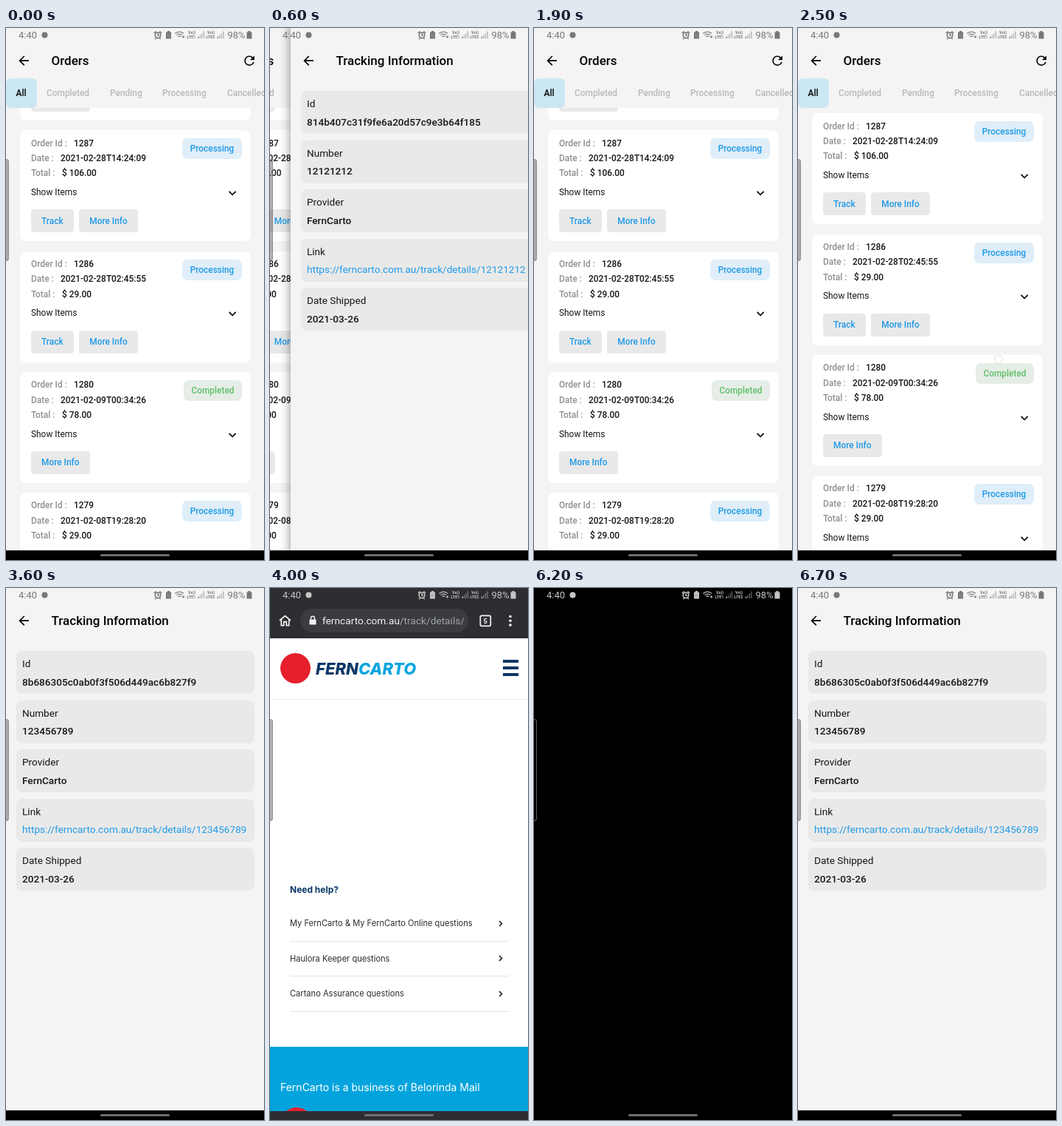
Recreate the animation shown at these times as an HTML page. Size 350x719 px, loop 6.8 s.

```html
<!DOCTYPE html>
<html lang="en">
<head>
<meta charset="utf-8">
<title>Orders and tracking</title>
<style>
  * { box-sizing: border-box; margin: 0; }
  html, body { width: 100%; height: 100%; overflow: hidden; background: #000; }
  body { font: 500 11.9px/20px Roboto, sans-serif; color: #161616; }
  #stage { position: relative; width: 350px; height: 719px; overflow: hidden; background: #000; }
  #stage div, #stage p, #stage svg { position: absolute; }
  p { white-space: pre; }
  #app { left: 0; top: 0; width: 350px; height: 706px; overflow: hidden; }
  .page { inset: 0; background: #f4f4f4; }
  .track::before { content: ""; position: absolute; left: -17.5px; top: 0; width: 17.5px; height: 100%;
    background: linear-gradient(90deg, rgba(0,0,0,0), rgba(0,0,0,.016) 30%, rgba(0,0,0,.07) 60%, rgba(0,0,0,.22)); }
  .title { font-size: 17px; color: #000; }
  .icon { width: 20.4px; height: 20.4px; fill: #000; }

  .tab { color: #b9b9b9; }
  .tab.on { color: #000; }
  #all { left: 0; top: 68px; width: 42px; height: 40px; border-radius: 7px; background: #cce7f4; }
  #view { left: 0; top: 108px; width: 350px; height: 598px; overflow: hidden; }
  #list { inset: 0; }
  .card { left: 19px; width: 312.5px; height: 150px; border-radius: 8px; background: #fff; }
  .key { color: #8f8f8f; }
  .plain { font-weight: 400; }
  .pill, .btn { display: flex; align-items: center; justify-content: center; color: #209ae6; }
  .pill { right: 11.5px; top: 11px; height: 28px; border-radius: 7px; background: #dfeef8; width: 81px; }
  .pill.done { width: 79px; color: #5fc069; background: #e6ede6; }
  .btn { top: 107px; height: 31px; border-radius: 4px; background: #e9e9e9; }

  .box { left: 14px; width: 322.5px; height: 58px; border-radius: 8px; background: #e9e9e9; }
  .box p { left: 8px; font-size: 13.6px; }
  .box .link { color: #209ae6; font-weight: 400; }

  #web { inset: 0; overflow: hidden; background: #fff; font-family: Inter, sans-serif; }
  #bar, #nav { left: 0; width: 350px; background: #2d2e31; }
  #bar { top: 0; height: 68px; }
  #nav { top: 707px; height: 12px; }
  #pill { left: 41px; top: 28px; width: 228px; height: 32px; border-radius: 16px; background: #3b3c40; }
  #url { left: 71px; top: 34px; width: 192px; overflow: hidden; font: 400 13.7px/20px Roboto, sans-serif; color: #a2a5a9; }
  #url b { font-weight: 400; color: #f2f2f2; }
  #head { left: 0; top: 67px; width: 350px; height: 84px; background: #fff; border-bottom: 1px solid #ebebeb; }
  .disc { border-radius: 50%; background: #e5202c; }
  .mark { font-size: 22px; font-weight: 800; font-style: italic; color: #0b3767; }
  .mark i { color: #08a5df; }
  #body { inset: 0; }
  #foot { left: 0; top: 400px; width: 350px; height: 340px; background: #03a4dd; }
  .help { font-size: 12px; font-weight: 700; color: #0b3767; }
  .row { font-size: 11.1px; font-weight: 400; color: #2c2c2c; }
  .note { font-size: 14px; font-weight: 400; color: #fff; }
  .owner { font: 500 24px/20px Roboto, sans-serif; color: #fff; }
  .menu { font-size: 16px; font-weight: 700; color: #fff; }
  .rule { height: 1px; }
  .bar { left: 316px; width: 21px; height: 4px; background: #0b3767; }

  #black { inset: 0; background: #000; }
  #status { left: 0; top: 0; width: 350px; height: 20px; }
  #edge { left: -4px; top: 177px; width: 8px; height: 138px; border-radius: 4px;
          background: rgba(0, 0, 0, .3); border: 1px solid rgba(135, 135, 135, .7); }
  #grip { left: 128px; top: 711px; width: 94px; height: 3px; border-radius: 2px; background: #6e6e6e; }
  #dot { left: -6px; top: -6px; width: 12px; height: 12px; border-radius: 50%;
         background: rgba(255, 255, 255, .7); border: 1px solid rgba(170, 170, 170, .35); }
  #back { left: -6px; top: -9px; width: 12px; height: 18px; fill: none; stroke: #acacac; stroke-width: 1.6; }
</style>
</head>
<body>
<div id="stage">
  <div id="app">
    <div id="orders" class="page"></div>
    <div id="first" class="page track"></div>
    <div id="second" class="page track"></div>
  </div>
  <div id="web">
    <div id="body"></div>
    <div id="head">
      <div class="disc" style="left:13.5px;top:21px;width:41px;height:41px"></div>
      <p class="mark" style="left:62px;top:32px">FERN<i>CARTO</i></p>
      <div class="bar" style="top:30px"></div>
      <div class="bar" style="top:39px"></div>
      <div class="bar" style="top:48px"></div>
    </div>
    <div id="bar">
      <div id="pill"></div>
      <svg width="350" height="67" fill="none" stroke="#f2f2f2" stroke-width="1.7">
        <path d="M13 44 20.5 37.5 28 44M15.3 42.500V50.700h3.400v-5h3.600v5h3.400V42.500"/>
        <rect x="285.3" y="37.3" width="14" height="14" rx="2"/>
        <path d="M55.5 43v-2.2a2.5 2.5 0 0 1 5 0V43" stroke-width="1.4"/>
        <g fill="#f2f2f2" stroke="none">
          <rect x="53.5" y="42.5" width="9" height="7" rx="1"/>
          <circle cx="326" cy="38.5" r="1.8"/><circle cx="326" cy="44.3" r="1.8"/><circle cx="326" cy="50.1" r="1.8"/>
          <text x="292.3" y="47.7" font-size="9.5" font-weight="700" font-family="Roboto, sans-serif" text-anchor="middle">5</text>
        </g>
      </svg>
      <p id="url"><b>ferncarto.com.au</b>/track/details/</p>
    </div>
    <div id="nav"></div>
  </div>
  <div id="black"></div>
  <svg id="status" fill="currentColor" font-family="Roboto, sans-serif">
    <g font-size="13" font-weight="400">
      <text x="17" y="14">4:40</text><text x="300.5" y="14">98%</text>
    </g>
    <circle cx="52.5" cy="9.5" r="4"/>
    <g fill="none" stroke="currentColor" stroke-width="1.6">
      <circle cx="206" cy="9.8" r="3.8"/>
      <path d="M206 7.5V10h2M201 6.800l2.600-2.300M211 6.800l-2.600-2.300M202.300 15l1.200-1.500M209.700 15l-1.200-1.500"/>
      <path d="M229.5 7.5a8 8 0 0 1 11.5 0M231.5 9.700a5.200 5.200 0 0 1 7.500 0M233.500 11.800a2.500 2.500 0 0 1 3.500 0" stroke-width="1.2"/>
      <path d="M238.500 12h4M240.500 10.300v3.400" stroke-width="1"/>
    </g>
    <path d="M217 5.500h2V4h3v1.500h2v9h-7zM326.500 5.500h2V4h3v1.500h2v9h-7z"/>
    <path d="M219 8.500h3v3h-3z" fill="none" stroke="#999" stroke-width=".8"/>
    <g font-size="5.4" font-weight="700">
      <text x="247" y="8">Vo))</text><text x="245.5" y="14">LTE1</text>
      <text x="273" y="8">Vo))</text><text x="271.5" y="14">LTE2</text>
    </g>
    <g stroke="currentColor" stroke-width="1.3">
      <path d="M261 11.500v2.500M287.500 11.500v2.500"/>
      <path d="M263.500 9.500v4.500M266 7v7M268.500 4.500v9.500M290 9.500v4.500M292.500 7v7M295 4.500v9.500" opacity=".5"/>
    </g>
  </svg>
  <div id="edge"></div>
  <div id="grip"></div>
  <svg id="back"><path d="M10.5 1 2 9l8.5 8"/></svg>
  <div id="dot"></div>
</div>
<script>
const $ = id => document.getElementById(id);

// Static content: x is the left edge, y the middle of the line
const text = (x, y, str, cls = '') =>
  `<p class="${cls}" style="left:${x}px;top:${y - 10}px">${str}</p>`;
const icon = (x, y, d) =>
  `<svg class="icon" viewBox="0 0 24 24" style="left:${x - 10.2}px;top:${y - 10.2}px"><path d="${d}"/></svg>`;
const btn = (x, w, str) => `<div class="btn" style="left:${x}px;width:${w}px">${str}</div>`;

const ARROW = 'M20 11H7.83l5.59-5.59L12 4l-8 8 8 8 1.41-1.41L7.83 13H20z';
const REFRESH = 'M17.65 6.35A8 8 0 1 0 19.73 14h-2.08A6 6 0 1 1 12 6c1.66 0 3.14.69 4.22 1.78L13 11h7V4z';
const DOWN = 'M16.59 8.59 12 13.17 7.41 8.59 6 10l6 6 6-6z';

function card([id, date, total, done], i) {
  const buttons = done ? btn(15, 79.5, 'More Info') : btn(15, 57.5, 'Track') + btn(80, 80, 'More Info');
  return `<div class="card" style="top:${30.3 + 163.3 * (i - 1)}px">
    ${text(15, 17.3, 'Order Id :', 'key')}${text(73, 17.3, id)}
    ${text(15, 37.7, 'Date :', 'key')}${text(55, 37.7, date)}
    ${text(15, 58.2, 'Total :', 'key')}${text(57, 58.2, '$ ' + total)}
    ${text(15, 83.7, 'Show Items', 'plain')}${icon(288.5, 85, DOWN)}
    <div class="pill ${done ? 'done' : ''}">${done ? 'Completed' : 'Processing'}</div>${buttons}</div>`;
}

const orders = [
  ['1288', '2021-03-01T10:12:40', '54.00', true],
  ['1287', '2021-02-28T14:24:09', '106.00'],
  ['1286', '2021-02-28T02:45:55', '29.00'],
  ['1280', '2021-02-09T00:34:26', '78.00', true],
  ['1279', '2021-02-08T19:28:20', '29.00']
];
const tabs = [[55, 'Completed'], [141, 'Pending'], [212, 'Processing'], [300, 'Cancelled']];
const appBar = title => icon(24, 44, ARROW) + text(61.5, 44, title, 'title');

$('orders').innerHTML = appBar('Orders') + icon(330, 44, REFRESH) +
  '<div id="all"></div>' + text(13.5, 87.5, 'All', 'tab on') +
  tabs.map(([x, name]) => text(x, 87.5, name, 'tab')).join('') +
  `<div id="view"><div id="list">${orders.map(card).join('')}</div></div>`;

function tracking(id, number) {
  const rows = [['Id', id], ['Number', number], ['Provider', 'FernCarto'],
    ['Link', 'https://ferncarto.com.au/track/details/' + number, 'link'], ['Date Shipped', '2021-03-26']];
  return appBar('Tracking Information') + rows.map(([key, val, cls], i) =>
    `<div class="box" style="top:${85.3 + 66.4 * i}px">${text(8, 17, key, 'plain')}${text(8, 41.7, val, cls)}</div>`).join('');
}
$('first').innerHTML = tracking('814b407c31f9fe6a20d57c9e3b64f185', '12121212');
$('second').innerHTML = tracking('8b686305c0ab0f3f506d449ac6b827f9', '123456789');

const rule = (x, y, w, color) =>
  `<div class="rule" style="left:${x}px;top:${y}px;width:${w}px;background:${color}"></div>`;
const arrow = (x, y, color) =>
  `<svg width="6" height="9" style="left:${x - 3}px;top:${y - 4.5}px" fill="none" stroke="${color}" stroke-width="1.7"><path d="M1 1l3.5 3.5L1 8"/></svg>`;

const help = ['My FernCarto &amp; My FernCarto Online questions', 'Haulora Keeper questions', 'Cartano Assurance questions'];
const menu = ['About us', 'Terms &amp; conditions', 'Privacy'];
$('body').innerHTML = text(27, 187.5, 'Need help?', 'help') +
  help.map((str, i) => {
    const y = 233 + 47.6 * i;
    return text(27, y, str, 'row') + arrow(313, y, '#222') + rule(27, Math.round(y + 23.5), 297, '#e4e4e4');
  }).join('') +
  '<div id="foot"></div>' + text(14, 454.5, 'FernCarto is a business of Belorinda Mail', 'note') +
  '<div class="disc" style="left:13.5px;top:482px;width:44px;height:44px"></div>' +
  text(65, 504.5, 'Belorinda Mail', 'owner') +
  menu.map((str, i) => {
    const y = 601 + 47.5 * i;
    return text(14, y, str, 'menu') + arrow(326.5, y - 1, '#fff') + rule(14, Math.round(y + 23), 322, '#1798cb');
  }).join('');

// Motion: keys are [ms, value, easing to the next key]
const LOOP = 6800, STEP = 100;
const SLIDE = 'cubic-bezier(.35,.91,.33,.97)', HOLD = 'step-end';
const anims = [];

function play(id, prop, ...keys) {
  const end = [LOOP, keys.at(-1)[1]];
  const frames = [...keys, end].map(([t, val, easing = 'linear']) => ({ offset: t / LOOP, [prop]: val, easing }));
  const anim = $(id).animate(frames, LOOP);
  anim.pause();
  anims.push(anim);
}
// Times alternate between appearing and vanishing
const show = (id, ...times) =>
  play(id, 'opacity', [0, 0, HOLD], ...times.map((t, i) => [t, 1 - i % 2, HOLD]));

play('orders', 'translate', [0, '0px'], [400, '0px', SLIDE], [800, '-116.67px'], [1300, '-116.67px', SLIDE],
  [1700, '0px'], [3000, '0px', SLIDE], [3400, '-116.67px']);
play('first', 'translate', [0, '350px'], [400, '350px', SLIDE], [800, '0px'], [1300, '0px', SLIDE], [1700, '350px']);
play('second', 'translate', [0, '350px'], [3000, '350px', SLIDE], [3400, '0px']);
show('first', 400, 1700);
show('second', 3000);

play('list', 'translate', [0, '0 0px'], [2100, '0 0px'], [2500, '0 -23px', 'ease-out'], [2800, '0 -30px']);

show('web', 3700, 6200);
show('url', 3900);
show('head', 4000);
show('body', 4000);
play('body', 'translate', [0, '0 220px'], [4200, '0 220px', 'ease-out'], [4900, '0 0px'], [5000, '0 -2px']);

play('black', 'opacity', [0, 0, HOLD], [6200, 1, 'ease-in-out'], [6700, 0]);
play('status', 'color', [0, '#777', HOLD], [3700, '#c6c6c6', HOLD], [6400, '#777']);

show('dot', 100, 300, 900, 1500, 2200, 2700, 2900, 3100, 5500, 6000);
play('dot', 'translate', [0, '62px 261px', HOLD], [900, '339px 416px'], [1300, '291px 416px', HOLD],
  [2100, '272px 471px'], [2500, '272px 448px'], [2700, '272px 443px', HOLD],
  [2900, '62px 394px', HOLD], [5500, '339px 374px'], [5900, '296px 374px']);
show('back', 1100, 1500, 5600, 6000);
play('back', 'translate', [0, '341px 378px', HOLD], [1000, '341px 378px'], [1300, '319px 378px', HOLD],
  [5500, '341px 336px'], [5900, '319px 336px']);

const start = performance.now();
function tick() {
  const t = (performance.now() - start) % LOOP;
  const now = Math.floor(t / STEP) * STEP + .01;
  for (const anim of anims) anim.currentTime = now;
  requestAnimationFrame(tick);
}
tick();
</script>
</body>
</html>
```
